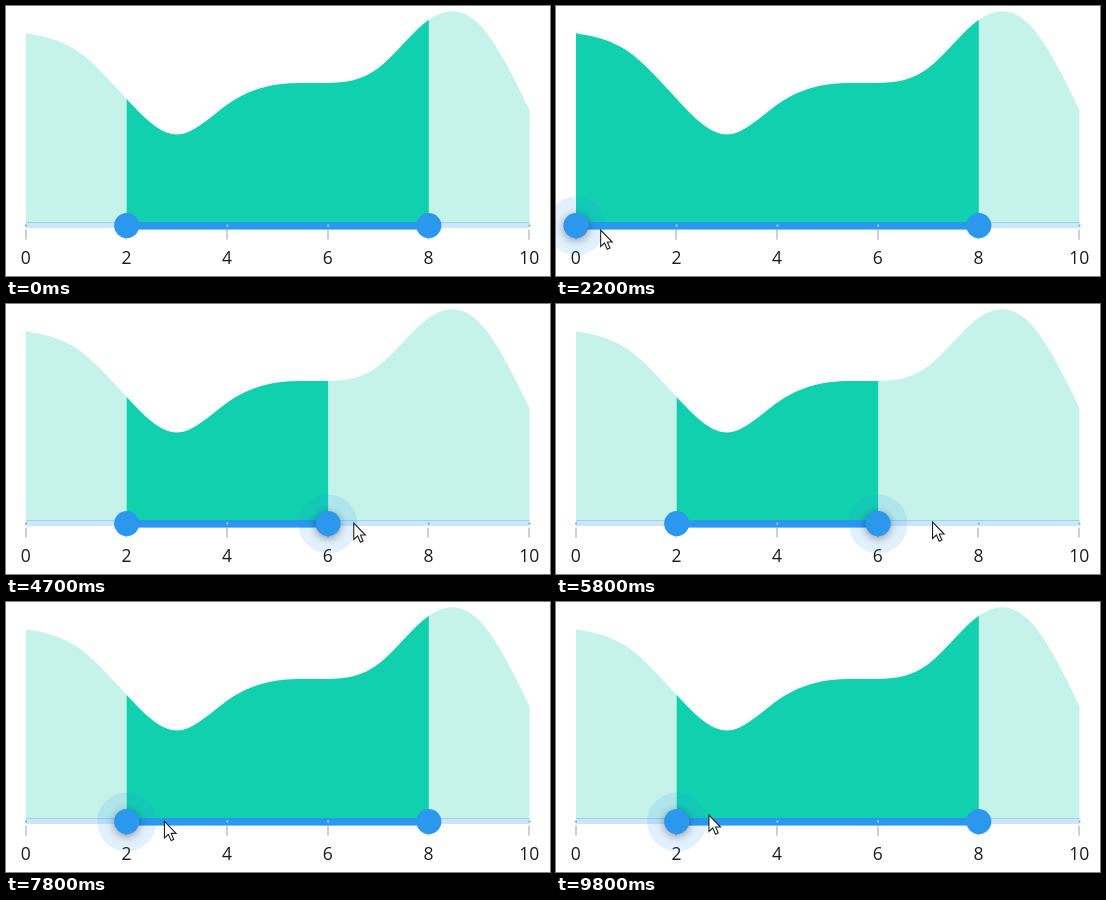
These frames come from a looping animation (544x270 px, 10000 ms). An HTML page with a canvas:

```html
<!DOCTYPE html>
<html lang="en">
<head>
<meta charset="utf-8">
<title>Range selector</title>
<style>
html, body { margin: 0; width: 100%; height: 100%; overflow: hidden; background: #fff; }
canvas { display: block; }
</style>
</head>
<body>
<canvas id="stage" width="544" height="270"></canvas>
<script>
const ctx = document.getElementById('stage').getContext('2d');
const LOOP = 10000, STEP = 100;
const LEFT = 20, UNIT = 50.35, BASE = 216, TRACK_Y = 219.6;
const SNAP = 2, GRIP = 0.3; // the pointer holds a thumb slightly right of its centre
const BLUE = '#2b98ee';
const heights = [27.2, 44.3, 93, 128.5, 98.5, 78.5, 77, 62, 13.8, 18.3, 104];

// Pointer moves: [begin, end, scale value, y]. The first move of a drag only reaches the thumb.
const entry = [100, 100, 8.1, 256];
const drags = [
  { thumb: 'from', moves: [[100, 400, 2.3, 222], [1000, 1700, 0.48, 224], [2200, 2700, 2.3, 222]] },
  { thumb: 'to', moves: [[2700, 3400, 8.3, 221], [3400, 3700, 10, 221], [3900, 4500, 6.5, 219],
                         [4700, 5100, 4.5, 218], [5300, 6000, 8.1, 218]] },
  { thumb: 'from', moves: [[6000, 6300, 2.3, 232], [6800, 7000, 0.7, 225], [7400, 8400, 5.8, 211],
                           [8500, 9100, 4.3, 211], [9300, 9800, 2.63, 213]] }
];

const xOf = v => LEFT + v * UNIT;
const mix = (a, b, k) => a + (b - a) * k;
const snap = v => Math.round((v - GRIP) / SNAP) * SNAP;

function stateAt(t) {
  const state = { from: 2, to: 8, held: '', pointer: null };
  let last = entry;
  for (const { thumb, moves } of drags) {
    moves.forEach((move, i) => {
      const [begin, end, value, y] = move;
      if (t < begin) return;
      const k = Math.min(1, (t - begin) / (end - begin));
      const p = mix(last[2], value, k);
      state.pointer = [xOf(p), mix(last[3], y, k)];
      state.held = i || k === 1 ? thumb : '';
      if (i) state[thumb] = snap(p);
      last = move;
    });
  }
  return state;
}

// Slopes of a natural cubic spline through evenly spaced points
function splineSlopes(y) {
  const n = y.length - 1, c = [], d = [];
  for (let i = 0; i <= n; i++) {
    const edge = i === 0 || i === n;
    const rhs = 3 * (y[Math.min(i + 1, n)] - y[Math.max(i - 1, 0)]);
    const m = (edge ? 2 : 4) - (i ? c[i - 1] : 0);
    c[i] = 1 / m;
    d[i] = (rhs - (i ? d[i - 1] : 0)) / m;
  }
  for (let i = n - 1; i >= 0; i--) d[i] -= c[i] * d[i + 1];
  return d;
}

function buildArea() {
  const s = splineSlopes(heights), p = new Path2D();
  p.moveTo(xOf(0), BASE);
  p.lineTo(xOf(0), heights[0]);
  for (let i = 1; i < heights.length; i++) {
    p.bezierCurveTo(
      xOf(i - 2 / 3), heights[i - 1] + s[i - 1] / 3,
      xOf(i - 1 / 3), heights[i] - s[i] / 3,
      xOf(i), heights[i]);
  }
  p.lineTo(xOf(10), BASE);
  p.closePath();
  return p;
}

const area = buildArea();
const arrow = new Path2D('M0 0V16.5L3.9 13L6.6 19.2L9.3 18L6.7 12H11.6Z');

function rect(x, y, w, h, color) {
  ctx.fillStyle = color;
  ctx.fillRect(x, y, w, h);
}

function disc(x, y, r, color) {
  ctx.fillStyle = color;
  ctx.beginPath();
  ctx.arc(x, y, r, 0, Math.PI * 2);
  ctx.fill();
}

function drawArea(from, to) {
  ctx.fillStyle = '#c5f2e9';
  ctx.fill(area);
  ctx.save();
  ctx.beginPath();
  ctx.rect(xOf(from), 0, xOf(to) - xOf(from), BASE);
  ctx.clip();
  ctx.fillStyle = '#11d0ad';
  ctx.fill(area);
  ctx.restore();
}

function drawScale(from, to) {
  rect(xOf(0), 216, UNIT * 10, 6, '#cde6fa');
  rect(xOf(0), 216, UNIT * 10, 1, '#9bd2f3');
  rect(xOf(from), 216, xOf(to) - xOf(from), 7.6, BLUE);
  ctx.font = '17.5px "Open Sans", "Noto Sans", sans-serif';
  ctx.textAlign = 'center';
  for (let v = 0; v <= 10; v += 2) {
    const x = xOf(v), active = v >= from && v <= to;
    rect(Math.floor(x) - 0.5, 223.6, 1, 10, '#a0a0a0');
    disc(x, TRACK_Y, 1.1, active ? '#a9d6fa' : '#64b2ef');
    ctx.fillStyle = '#1c1c1c';
    ctx.fillText(v, x - 0.3, 258);
  }
}

function drawThumb(v, pressed) {
  const x = xOf(v);
  ctx.save();
  if (pressed) {
    disc(x, TRACK_Y + 0.3, 29.5, 'rgba(33,150,243,0.13)');
    ctx.shadowColor = 'rgba(0,0,0,0.38)';
    ctx.shadowBlur = 9;
    ctx.shadowOffsetY = 2;
  }
  disc(x, TRACK_Y, 12.6, BLUE);
  ctx.restore();
}

function drawPointer(x, y) {
  ctx.save();
  ctx.translate(x + 0.5, y);
  ctx.fillStyle = '#fff';
  ctx.strokeStyle = '#222';
  ctx.lineWidth = 1.1;
  ctx.fill(arrow);
  ctx.stroke(arrow);
  ctx.restore();
}

function draw(t) {
  const { from, to, held, pointer } = stateAt(t);
  rect(0, 0, 544, 270, '#fff');
  drawArea(from, to);
  drawScale(from, to);
  drawThumb(from, held === 'from');
  drawThumb(to, held === 'to');
  if (pointer) drawPointer(...pointer);
}

const began = performance.now();
function tick() {
  const t = (performance.now() - began) % LOOP;
  draw(Math.floor(t / STEP) * STEP);
  requestAnimationFrame(tick);
}
tick();
</script>
</body>
</html>
```
